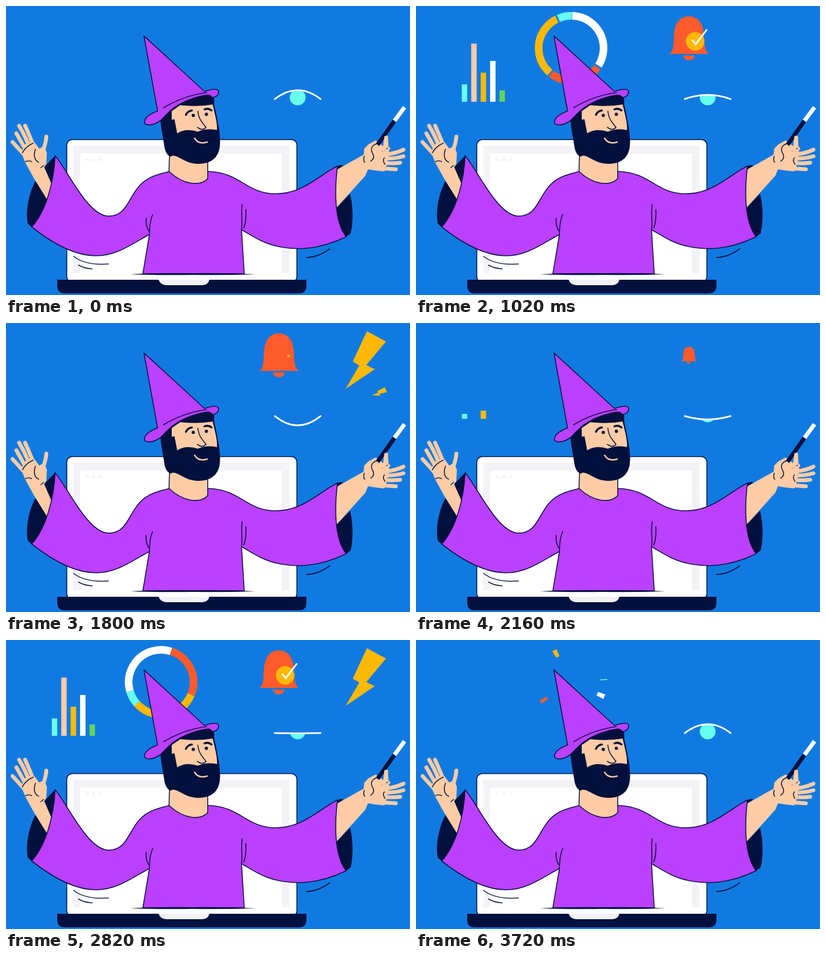
An HTML page that plays this animation: 741x531 px, repeating every 3.78 s.

```html
<!DOCTYPE html>
<html lang="en">
<head>
<meta charset="utf-8">
<title>Wizard</title>
<style>
  html, body { margin: 0; height: 100%; overflow: hidden; background: #117ae1; }
  svg { display: block; width: 741px; height: 531px; }
  .navy { fill: #02103d; }
  .skin { fill: #ffcca6; }
  .robe { fill: #bb40ff; stroke: #02103d; stroke-width: 1.6; stroke-linejoin: round; }
  .ink { fill: none; stroke: #02103d; stroke-width: 1.6; stroke-linecap: round; stroke-linejoin: round; }
  .finger { fill: none; stroke: #ffcca6; stroke-width: 7; stroke-linecap: round; stroke-linejoin: round; }
  .gold { fill: #fdb905; }
  .red { fill: #ff5b2c; }
</style>
</head>
<body>
<svg viewBox="0 0 741 531">
  <defs>
    <path id="bolt" d="M39-106 74-87 38-44 53-36 0 0 25-43 13-50Z"/>
    <clipPath id="below"><path id="lidArea"/></clipPath>
  </defs>

  <g id="ring" fill="none" stroke-width="14"></g>
  <g id="bars"></g>
  <g id="bell" class="red">
    <path d="M465 88C474 81 472 66 473 55C474 32 484 19 500 19C518 19 527 32 528 55C529 66 528 81 537 88Z"/>
    <path d="M490 91H511A10.5 9 0 0 1 490 91Z"/>
  </g>
  <g id="check">
    <circle class="gold" cx="512" cy="65" r="17"/>
    <path d="M507 63 513 70 533 44" fill="none" stroke="#fff" stroke-width="3" stroke-linecap="round"/>
  </g>
  <use id="bigBolt" class="gold" href="#bolt"/>
  <use id="smallBolt" class="gold" href="#bolt"/>
  <circle cx="535" cy="168" r="14.5" fill="#66ffee" clip-path="url(#below)"/>
  <path id="lid" fill="none" stroke="#fff" stroke-width="3" stroke-linecap="round"/>

  <g id="laptop">
    <rect x="111.500" y="245.500" width="422" height="262" rx="10" fill="#fff" stroke="#02103d" stroke-width="1.600"/>
    <path d="M123 257H520V491H123Z" fill="#f3f3f7"/>
    <path d="M136 271H506V491H136Z" fill="#fff"/>
    <path d="M146 280h6v5h-6zm12 0h6v5h-6zm13 0h6v5h-6z" fill="#f5f5f8"/>
    <path class="navy" d="M94 503H551V514Q551 528 537 528H108Q94 528 94 514Z"/>
    <path d="M280 503H373Q371 513 358 513H296Q283 513 280 503Z" fill="#f1f1f6"/>
  </g>
  <path class="ink" d="M124 460Q145 477 188 474M133 476Q143 482 158 483"/>
  <path class="ink" d="M551 462Q572 462 594 446" stroke-width="1.200"/>

  <g id="leftArm">
    <path class="navy" d="M55 320C43 340 35 375 40 400L47 406 82 370 90 275 72 294Z"/>
    <path class="finger" d="M12 250 32 272M19 234 36 264M35 220Q44 240 50 256M74 240Q73 254 66 270"/>
    <path class="finger" d="M24 220Q36 240 42 258" stroke-width="6"/>
    <path class="skin" d="M28 270 33 256 42 250 52 250 61 262 70 257 75 270 74 290 70 296 84 328 84 360 75 355 52 318 36 289Z"/>
    <path class="ink" d="M30 270Q36 258 50 252M54 263C50 274 52 284 60 287M36 286Q41 283 47 286M64 297 69 293"/>
  </g>

  <g id="rightArm">
    <path class="navy" d="M605 372 631 345C638 372 636 405 632 418L624 424 600 400ZM605 298Q610 290 619 293L606 302Z"/>
    <path class="skin" d="M603 303 656 273 657 262 665 254 678 247 690 256 703 267 699 290 694 304 676 302 664 300 659 312 603 374Z"/>
    <path class="finger" d="M697 241 695 262M701 262 690 270M695 273Q714 271 729 264M692 280Q712 281 729 276M690 288Q708 290 723 288M685 298 715 300"/>
    <path class="ink" d="M683 252C671 255 668 262 672 270M657 276Q655 285 658 287M672 270Q678 279 669 285M690 266 700 261M694 279Q690 284 695 291"/>
    <path d="M681.500 255 712.500 211" stroke="#02103d" stroke-width="7.500"/>
    <path d="M712.500 211 731 186" stroke="#fff" stroke-width="7.500"/>
    <path class="finger" d="M697 242 698 257 692 263"/>
  </g>

  <path class="robe" d="M90 275C112 300 150 386 188 386C232 386 222 330 272 312Q286 307 300 304H370C430 305 440 345 495 345C545 345 575 310 608 294C603 335 601 395 624 424C570 450 530 448 500 442C470 436 450 421 432 411L437 492H251L263 420C235 434 205 459 165 459C130 459 90 440 47 406C75 375 88 320 90 275Z"/>
  <path class="ink" d="M269 383C262 400 264 410 263 420M257 390Q256 404 262 413M433 365C431 385 434 400 432 410M440 374Q441 396 436 408"/>
  <path class="navy" d="M228 493Q290 490 343 491Q400 490 458 493Q400 495 343 494Q290 495 228 493Z"/>

  <g id="head">
    <path class="skin" d="M300 255H370V317C356 332 326 328 299 304Z"/>
    <path class="ink" d="M300 270 299 304C326 329 356 332 370 317V285"/>
    <path class="navy" d="M283 200 310 180 381 164 382 182 386 200 391 228C394 250 393 265 387 274C376 293 345 294 326 283C315 278 308 272 302 277Q292 273 290 255C287 235 283 220 283 200Z"/>
    <path class="skin" d="M304 193 320 182Q350 186 379 181C383 198 388 215 387 228Q366 224 352 231Q330 224 314 234L309 208 304 209Z"/>
    <path class="navy" d="M319 182C340 164 372 158 381 166L382 178Q350 186 319 182Z"/>
    <path d="M346 243Q353 255 369 250" fill="none" stroke="#ffcca6" stroke-width="2.500" stroke-linecap="round"/>
    <path class="ink" d="M352 193C353 207 359 213 367 223Q360 230 351 223" stroke-width="2"/>
    <path d="M330 200Q333 193 341 192M364 190Q371 187 377 192" fill="none" stroke="#02103d" stroke-width="3.500" stroke-linecap="round"/>
    <circle class="navy" cx="343.500" cy="201" r="3"/>
    <circle class="navy" cx="367.500" cy="199" r="3"/>
  </g>

  <g id="hat">
    <path class="robe" d="M253 55 364 157Q388 149 390 157C390 164 385 168 378 168C376 164 372 163 366 164C342 168 318 178 303 191Q292 201 284 210C272 219 259 221 254 215C253 206 262 199 278 193Z"/>
    <path class="ink" d="M289 187Q325 165 368 159"/>
  </g>
</svg>
<script>
  const LOOP = 3780, STEP = 60, BLINK = 1260;
  const el = id => document.getElementById(id);

  function add(parent, tag, attrs) {
    const node = document.createElementNS('http://www.w3.org/2000/svg', tag);
    for (const key in attrs) node.setAttribute(key, attrs[key]);
    return el(parent).appendChild(node);
  }

  const clamp = x => Math.min(1, Math.max(0, x));
  const smooth = (t, from, to) => {
    const p = clamp((t - from) / (to - from));
    return p * p * (3 - 2 * p);
  };
  // Rises over a..b, falls over c..d
  const pulse = (t, a, b, c, d) => smooth(t, a, b) - smooth(t, c, d);
  const scaleAbout = (node, x, y, s) =>
    node.setAttribute('transform', `translate(${x} ${y}) scale(${s}) translate(${-x} ${-y})`);

  // Ring segments: colour, start angle, sweep
  const segments = [['#fff', 236, 124], ['#ff5b2c', 0, 95], ['#fdb905', 95, 116], ['#66ffee', 211, 25]]
    .map(([stroke, start, sweep]) => ({
      start, sweep,
      node: add('ring', 'circle', { cx: 284.5, cy: 77.5, r: 59.5, pathLength: 360, stroke })
    }));

  // Bars: colour, height, delay
  const bars = [['#66ffee', 32, 0], ['#fdcba9', 107, 100], ['#fdb905', 53.5, 0], ['#fff', 75, 100], ['#62d45c', 21, 100]]
    .map(([fill, height, delay], i) => ({
      height, delay,
      node: add('bars', 'rect', { x: 84 + i * 17.3, width: 10, fill })
    }));

  function drawRing(t) {
    const grow = smooth(t, 10, 490);
    const fade = clamp((t - 930) / 558) ** 2;
    const turn = 25 + 0.24 * (t - 600);
    for (const { node, start, sweep } of segments) {
      const length = sweep * (grow - fade);
      node.setAttribute('visibility', length > 0 ? 'visible' : 'hidden');
      node.setAttribute('stroke-dasharray', `${length} 360`);
      node.setAttribute('transform', `rotate(${start + turn - 90} 284.5 77.5)`);
    }
  }

  function drawBars(t) {
    for (const { node, height, delay } of bars) {
      const h = height * pulse(t, 558 + delay, 793 + delay, 1426, 1796);
      node.setAttribute('y', 176 - h);
      node.setAttribute('height', h);
    }
  }

  function drawBell(t) {
    scaleAbout(el('bell'), 501, 59, pulse(t, 540, 656, 1850, 1980));
    scaleAbout(el('check'), 519, 60, pulse(t, 896, 1016, 1700, 1830));
  }

  function drawBolts(t) {
    const big = pulse(t, 143, 290, 720, 880);
    const small = pulse(t, 440, 590, 620, 760);
    el('bigBolt').setAttribute('transform', `translate(623 121) scale(${big})`);
    el('smallBolt').setAttribute('transform', `translate(671 132.500) rotate(38.700) scale(${small / 3})`);
  }

  function drawEye(t) {
    const bend = 138.5 + 66.5 * pulse(t, 118, 482, 740, 1160);
    const curve = `M493 171Q535 ${bend} 577 171`;
    el('lid').setAttribute('d', curve);
    el('lidArea').setAttribute('d', curve + 'V215H493Z');
  }

  function draw(now) {
    const t = Math.floor(now % LOOP / STEP) * STEP;
    drawRing(t < 2250 ? t : t - 2250);
    drawBars(t < 2040 ? t : t - 1520);
    drawBell(t < 2040 ? t : t - 1571);
    drawBolts(t % BLINK);
    drawEye(t % BLINK);
    requestAnimationFrame(() => draw(performance.now()));
  }
  draw(0);
</script>
</body>
</html>
```
